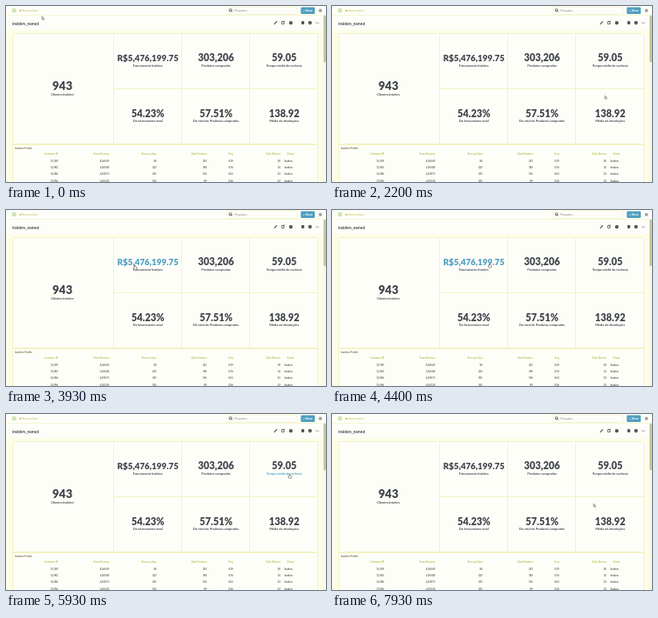
These frames come from a looping animation (400x220 px, 8 s). An HTML page with a canvas:

```html
<!DOCTYPE html>
<html lang="pt">
<head>
<meta charset="utf-8">
<title>Dashboard</title>
<style>
html, body { margin: 0; width: 100%; height: 100%; overflow: hidden; background: #fff; }
canvas { display: block; width: 400px; height: 220px; }
</style>
</head>
<body>
<canvas id="stage"></canvas>
<script>
const LOOP = 8000, HOP = 980, W = 400, H = 220;
const INK = '#41464c', BLUE = '#509fc0', OLIVE = '#b8bd4c', PALE = '#f1f1bd';
const BACK = '#fdfde9', PAPER = '#fefef9';
const canvas = document.getElementById('stage');
const ctx = canvas.getContext('2d');
const ratio = window.devicePixelRatio || 1;
canvas.width = W * ratio;
canvas.height = H * ratio;

// The pointer reaches one stop per hop
const stops = [
  [45, 13], [200, 88], [341, 112], [341, 112],
  [161, 69], [280.5, 62], [354.5, 75], [357, 129], [327, 112]
];

const metrics = [
  ['R$5,476,199.75', 'Faturamento Insiders'],
  ['303,206', 'Produtos comprados'],
  ['59.05', 'Tempo médio de recência'],
  ['54.23%', 'Do faturamento total'],
  ['57.51%', 'Do total de Produtos comprados'],
  ['138.92', 'Média de devoluções']
];

// Heading, right edge, highest value, decimals
const columns = [
  ['Customer ID', 65, 16000, 0], ['Gross Revenue', 129, 9000, 2],
  ['Recency Days', 188, 380, 0], ['Qtde Products', 251, 400, 0],
  ['Freq', 284, 0.9, 2], ['Qtde Returns', 343, 60, 0]
];

function random(seed) {
  const v = Math.sin(seed * 12.9898) * 43758.5453;
  return v - Math.floor(v);
}

function rect(x, y, w, h, fill) {
  ctx.fillStyle = fill;
  ctx.fillRect(x, y, w, h);
}

function frame(x, y, w, h, color, width) {
  ctx.strokeStyle = color;
  ctx.lineWidth = width;
  ctx.strokeRect(x, y, w, h);
}

function dot(x, y, r, fill) {
  ctx.fillStyle = fill;
  ctx.beginPath();
  ctx.arc(x, y, r, 0, Math.PI * 2);
  ctx.fill();
}

function line(x1, y1, x2, y2, color, width) {
  ctx.strokeStyle = color;
  ctx.lineWidth = width;
  ctx.beginPath();
  ctx.moveTo(x1, y1);
  ctx.lineTo(x2, y2);
  ctx.stroke();
}

function text(str, x, y, size, color = INK, align = 'left', weight = 700) {
  ctx.font = `${weight} ${size}px Lato, sans-serif`;
  ctx.textAlign = align;
  ctx.fillStyle = color;
  ctx.fillText(str, x, y);
}

function card(x, y, w, h) {
  rect(x, y, w, h, PAPER);
  frame(x, y, w, h, PALE, 0.9);
}

function pointerAt(t) {
  const i = Math.min(Math.floor(t / HOP), stops.length - 1);
  const [x, y] = stops[i];
  const [nx, ny] = stops[Math.min(i + 1, stops.length - 1)];
  const k = Math.max(0, (t / HOP - i - 0.2) / 0.8);
  const e = k * k * (3 - 2 * k);
  return { x: x + (nx - x) * e, y: y + (ny - y) * e };
}

function gear(x, y) {
  for (let a = 0; a < Math.PI; a += Math.PI / 4) {
    const c = Math.cos(a) * 2.1, s = Math.sin(a) * 2.1;
    line(x - c, y - s, x + c, y + s, '#777b75', 0.8);
  }
  dot(x, y, 1.5, '#777b75');
  dot(x, y, 0.7, '#fff');
}

function navbar() {
  rect(0, 0, W, 30, PAPER);
  rect(0, 11, W, 0.6, PALE);
  rect(7.5, 3, 5, 5, '#cfe4b4');
  rect(17, 4.8, 1.8, 2, OLIVE);
  text('Nossas análises', 20, 7, 2.9, '#c9cd78');

  frame(276, 1, 88, 9.4, PALE, 0.7);
  dot(280.6, 5.2, 1.9, INK);
  dot(280.6, 5.2, 1.1, PAPER);
  line(281.7, 6.3, 283, 7.6, INK, 0.8);
  text('Pesquisar…', 285.5, 7, 3.5, '#858878', 'left', 400);

  ctx.fillStyle = BLUE;
  ctx.beginPath();
  ctx.roundRect(368.5, 1.5, 17.5, 8.5, 1.2);
  ctx.fill();
  text('+ Novo', 377.3, 7, 3.7, '#fff', 'center');
  gear(393, 5.7);
}

function titleBar() {
  const y = 21;
  text('insiders_named', 8, 23.6, 4.8);
  line(335.3, y + 1.8, 338.6, y - 1.8, INK, 1.2);
  frame(344.7, y - 1.5, 2.8, 3, INK, 0.8);
  line(345.5, y - 2, 348.7, y - 2, INK, 0.6);
  dot(356, y, 2.2, INK);
  line(356, y - 1.2, 356, y + 0.5, PAPER, 0.5);
  rect(369.4, y - 2.1, 3.2, 4, INK);
  dot(380, y, 2.2, INK);
  line(380, y - 0.3, 380, y + 1.3, PAPER, 0.6);
  for (let i = -1; i < 2; i++) dot(389.1 + i * 1.5, y, 0.5, INK);
}

// Draws centred text that lights up under the pointer
function hoverText(str, x, y, size, weight, p) {
  ctx.font = `${weight} ${size}px Lato, sans-serif`;
  const half = ctx.measureText(str).width / 2;
  const hit = Math.abs(p.x - x) <= half && p.y > y - size * 0.8 && p.y < y + size * 0.18;
  text(str, x, y, size, hit ? BLUE : INK, 'center', weight);
  return hit;
}

function metric([value, label], x, y, size, p) {
  const onValue = hoverText(value, x, y, size, 900, p);
  const onLabel = hoverText(label, x, y + 6.5, 3.95, 700, p);
  return onValue || onLabel;
}

function metricGrid(p) {
  card(8.5, 34.5, 126, 138);
  let hover = metric(['943', 'Clientes insiders'], 70.5, 105.2, 14.4, p);
  metrics.forEach((m, i) => {
    const col = i % 3, row = Math.floor(i / 3);
    card(134.5 + col * 85, 34.5 + row * 69, 85, 69);
    const size = m[0].length > 10 ? 10.7 : 12.1;
    hover = metric(m, 177.3 + col * 85.2, 69.3 + row * 69.5, size, p) || hover;
  });
  return hover;
}

function table() {
  card(8.5, 173.5, 381, 60);
  text('Insiders Profile', 11, 178.7, 3.3, '#74774d');
  text('Cluster', 351, 186.2, 3, OLIVE);
  columns.forEach(([head, x, max, digits], c) => {
    text(head, x, 186.2, 3, OLIVE, 'right');
    for (let r = 0; r < 4; r++) {
      const share = c ? 0.1 + 0.9 * random(r * 7 + c) : 0.8 + 0.2 * random(r + 1);
      const value = (share * max).toLocaleString('en-US', {
        minimumFractionDigits: digits, maximumFractionDigits: digits
      });
      text(value, x, 194.6 + r * 8.3, 2.95, '#565a48', 'right');
    }
  });
  for (let r = 0; r < 4; r++) text('Insiders', 348, 194.6 + r * 8.3, 2.95, '#565a48');
}

function shape(points, p) {
  ctx.beginPath();
  points.forEach(([x, y]) => ctx.lineTo(p.x + x, p.y + y));
  ctx.closePath();
  ctx.fillStyle = '#fff';
  ctx.strokeStyle = '#6a6b60';
  ctx.lineWidth = 0.7;
  ctx.lineJoin = 'round';
  ctx.fill();
  ctx.stroke();
}

const arrow = [[0, 0], [0, 4], [0.9, 3.2], [1.7, 4.6], [2.3, 4.2], [1.7, 2.9], [2.8, 2.8]];
const hand = [[-0.5, 0], [0.5, 0], [0.6, 1.8], [2.6, 2.3], [2.2, 5.4], [-0.6, 5.4], [-1.9, 3], [-0.6, 3.3]];

function draw(t) {
  const p = pointerAt(t);
  ctx.setTransform(ratio, 0, 0, ratio, 0, 0);
  rect(0, 0, W, H, BACK);
  navbar();
  titleBar();
  const hover = metricGrid(p);
  table();
  rect(396.5, 11.5, 3.5, H, '#f8f8e4');
  rect(397, 12, 3, 58, '#c6c89a');
  shape(hover ? hand : arrow, p);
}

function tick() {
  draw(performance.now() % LOOP);
  requestAnimationFrame(tick);
}
tick();
</script>
</body>
</html>
```
